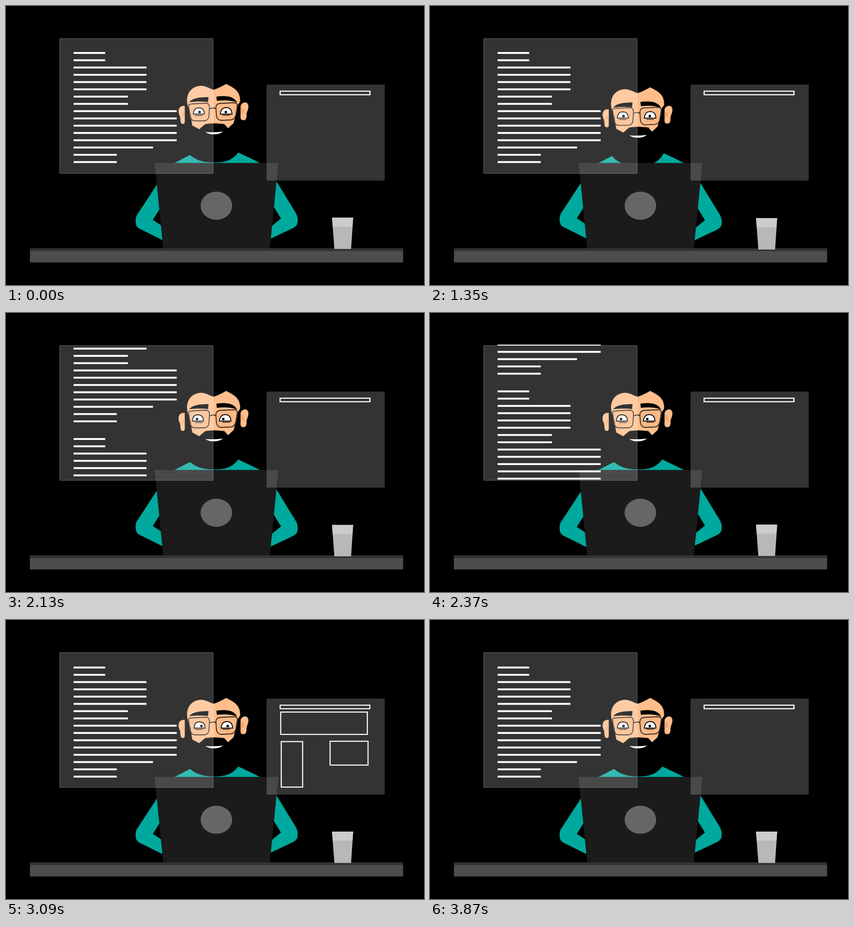
Animation, 900 px wide and 600 px high, one loop 4.14 s. Source, as an HTML page:

```html
<!DOCTYPE html>
<html lang="en">
<head>
<meta charset="utf-8">
<title>Coding at the desk</title>
<style>
html, body { margin: 0; width: 100%; height: 100%; overflow: hidden; background: #000; }
svg { display: block; width: 900px; height: 600px; }
.teal { fill: #00a99d; }
.skin { fill: #ffbe8c; stroke: #6b4a33; stroke-width: .6; }
.rim { fill: rgba(120, 50, 0, .04); stroke: #2e211a; stroke-width: 1.8; }
#eyes path { fill: #fff; stroke: #000; stroke-width: 1.8; }
.box { fill: none; stroke: #fff; stroke-width: 2.3; }
</style>
</head>
<body>
<svg viewBox="0 0 900 600">
  <defs><clipPath id="page"><rect x="115" y="68" width="332" height="293"/></clipPath></defs>

  <path class="teal" d="M360 339 L396 320.5 L412 329 H480 L500 315 L550 339Z"/>
  <g id="head">
    <path d="M386 305 C394 321 408 336.500 448 336.500 C478 336.500 490 328 500 315 L508 300Z"/>
    <path class="skin" d="M385 215 C373 213 369 224 373 234 C377 241 374 250 378 253 C382 255 385 253 385 249Z"/>
    <ellipse cx="382" cy="233" rx="3" ry="5" fill="#f5ab76"/>
    <path class="skin" d="M505 215 C508 205 522 204 522 216 C522 225 517 228 518 236 C518 245 513 247 508 245 C504 244 505 238 505 232Z"/>
    <ellipse cx="509" cy="226" rx="4" ry="6" fill="#f5a972"/>
    <path class="skin" d="M391 214 C385 187 401 172 420 171.5 C433 172 440 179 447 180 C457 177 466 172 474 167.5 C486 174 506 181 504 206 L499 213 L497 228 L490 252 L478 263 L470 254 Q447 251 429 254 L416 265 L401 257 L397 232Z"/>
    <g id="brows">
      <path d="M394 207 C402 198 415 196 436 196 L435 206.500 C420 205 408 205 394 207Z"/>
      <path d="M453 195 C472 192.500 490 193 498 208 C484 202 468 202.500 454 204Z"/>
    </g>
    <g id="glasses">
      <path class="rim" d="M393 213 Q394 211 401 210.500 L430 209 Q439 209 438 220 L437 237 Q436 246 427 247 L406 247 Q398 247 396 236Z"/>
      <path class="rim" d="M452 219 Q452 210 461 209.500 L490 208 Q498 208 498 214 L495 234 Q493 244 484 245 L464 246 Q455 246 453 236Z"/>
      <path d="M438 222 Q445 217 452 221" fill="none" stroke="#222" stroke-width="1.8"/>
    </g>
    <g id="gaze">
      <g id="eyes">
        <path d="M403.500 232.500 Q404 219 415 219 Q427 219 427 232.500Z"/>
        <path d="M461.500 232.500 Q463 218.500 474 218.500 Q486 218.500 486.500 232.500Z"/>
      </g>
      <g id="pupils"><circle cx="416.800" cy="228" r="2.800"/><circle cx="473.300" cy="228" r="2.800"/></g>
      <path d="M407 235.500H423M466 235H482" stroke="#222" stroke-width="1.500"/>
    </g>
    <path d="M429 271 Q447 272.500 467 270 Q460 276 447 276 Q436 276 429 271Z" fill="#fff"/>
  </g>

  <path id="armL" class="teal" d="M334 370 L281 451 Q277 462 281 473 Q284 478 292 481 L342 506 L342 477 L316 460 L342 419Z"/>
  <path id="armR" class="teal" d="M573 362 L625 447 Q630 457 627 469 Q625 474 617 478 L560 505 L564 480 L592 457 L567 416Z"/>
  <path d="M320 337.500H586.500L568 522H338.500Z" fill="#1b1b1b"/>
  <ellipse cx="453" cy="429.500" rx="34" ry="30.300" fill="#666"/>

  <g id="desk">
    <rect x="51.500" y="521.500" width="803.500" height="30" rx="1" fill="#4d4d4d"/>
    <rect x="51.500" y="521.500" width="803.500" height="5.500" fill="#333"/>
  </g>
  <g id="glass">
    <path d="M702 455H747.500L743 522.500H707Z" fill="#b8b8b8"/>
    <path d="M702 455H747.500L746 474.500H703.500Z" fill="#ccc"/>
  </g>

  <rect x="115.500" y="70" width="330.500" height="290" rx="1.500" fill="#fff" fill-opacity=".2" stroke="#fff" stroke-opacity=".22" stroke-width="1.500"/>
  <rect x="561" y="169" width="254.500" height="206.500" rx="1.500" fill="#fff" fill-opacity=".2"/>
  <g clip-path="url(#page)"><g id="code" fill="#fff"></g></g>
  <g id="boxes"></g>
  <rect class="box" x="590.300" y="183.200" width="193" height="7.600" style="fill:#333"/>
</svg>
<script>
const LOOP = 4140, STEP = 30;
const $ = id => document.getElementById(id);
const set = (el, attrs) => {
  for (const k in attrs) el.setAttribute(k, attrs[k]);
  return el;
};
const add = (parent, attrs) =>
  parent.appendChild(set(document.createElementNS('http://www.w3.org/2000/svg', 'rect'), attrs));
const move = (id, x, y, more = '') => set($(id), { transform: `translate(${x} ${y}) ${more}` });

// Smooth step from 0 to 1 between two times, and a wave of a given period
const ease = (t, from, to) => {
  const p = Math.min(1, Math.max(0, (t - from) / (to - from)));
  return (1 - Math.cos(Math.PI * p)) / 2;
};
const wave = (t, period) => Math.sin(2 * Math.PI * t / period);

// Two copies of the same page of code; each block is [width, lines]
const blocks = [[68, 2], [157, 4], [117, 2], [222, 5], [171, 1], [93, 2]];
const widths = blocks.flatMap(([width, lines]) => Array(lines).fill(width));
for (const top of [99, 371.6])
  widths.forEach((width, i) => add($('code'), { x: 145.5, y: top + i * 15.64, width, height: 4 }));

// Layout boxes unfold from the header bar: left, top, right, bottom
const header = [590.3, 183.2, 783.3, 190.8];
const boxes = [[591.5, 198, 778, 246], [592.7, 261.5, 638.7, 359.3], [697.8, 260.8, 779.5, 312]]
  .map(to => ({ to, el: add($('boxes'), { class: 'box' }) }));

function draw(t) {
  // The face tips a little further than the head
  const nod = ease(t, 120, 420) - ease(t, 1640, 1850);
  const tip = ease(t, 200, 620) - ease(t, 1560, 1800);
  const look = -5.5 * ease(t, 1650, 2050) + 9.5 * ease(t, 2750, 2980) - 4 * ease(t, 3550, 3870);
  move('head', 0, 7.3 * nod);
  move('brows', 0, 4.2 * tip);
  move('glasses', 0, 2.3 * tip);
  move('gaze', 0, 1.4 * tip);
  move('eyes', look * .38, 0);
  move('pupils', look, 0);

  const typing = t < 2160 ? wave(t, 126) : 0;
  const tilt = t < 2025 ? .65 * wave(t, 337.5) : 0;
  move('armL', 0, 3.6 * typing);
  move('armR', 0, -3.6 * typing);
  move('desk', 0, 0, `rotate(${tilt} 453 336)`);
  move('glass', 0, -1.4 * typing, `rotate(${Math.min(0, -1.6 * typing)} 725 489)`);

  move('code', 0, -271.4 * ease(t, 1724, 2687));

  const grow = ease(t, 2700, 3000) - ease(t, 3500, 3870);
  for (const { el, to } of boxes) {
    const [x, y, right, bottom] = header.map((v, i) => v + (to[i] - v) * grow);
    set(el, { x, y, width: right - x, height: bottom - y });
  }
}

const start = performance.now();
function tick() {
  const t = (performance.now() - start) % LOOP;
  draw(Math.floor(t / STEP) * STEP);
  requestAnimationFrame(tick);
}
tick();
</script>
</body>
</html>
```
